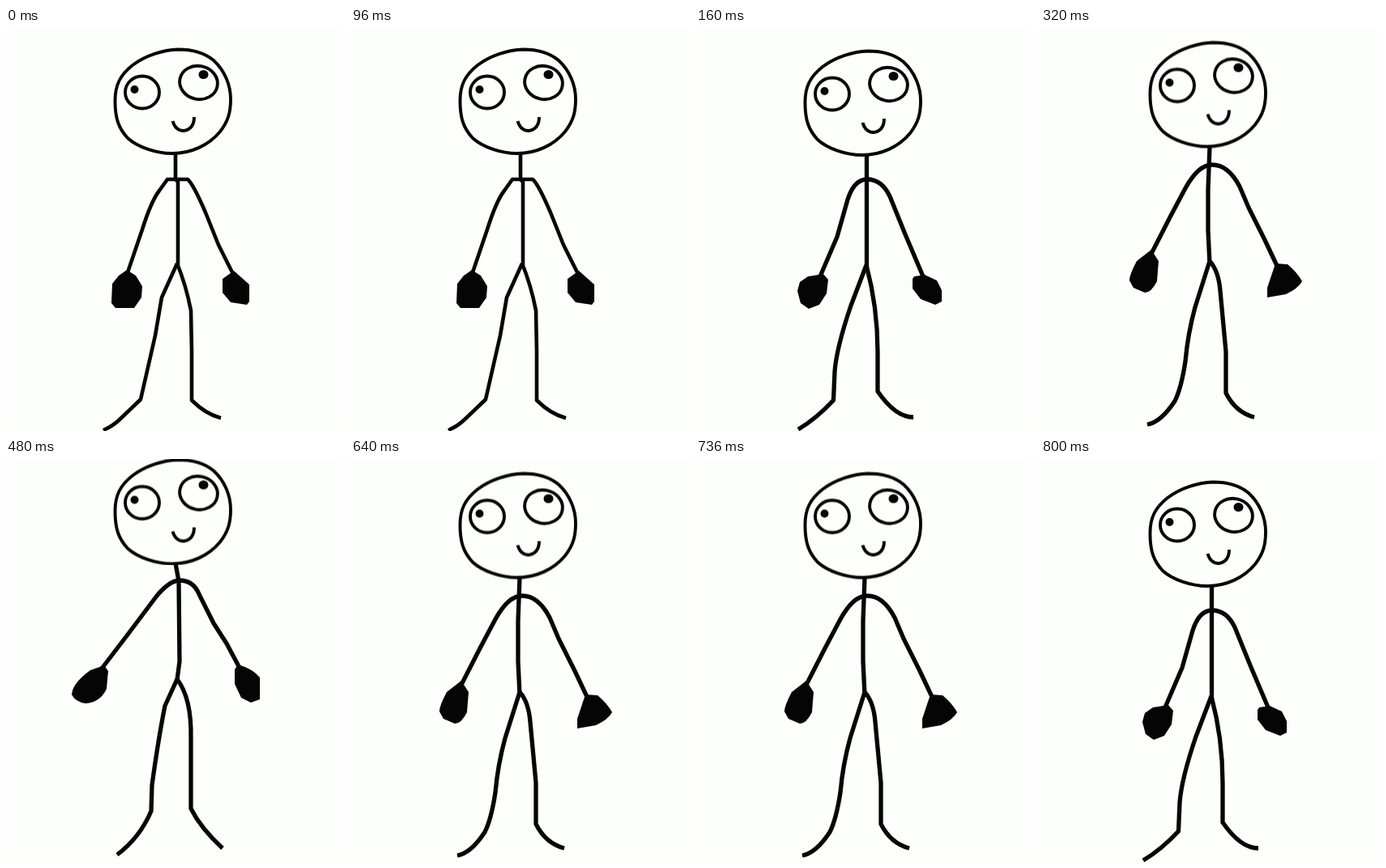
Recreate the animation shown at these times as an HTML page. Size 418 by 498 pixels, loop 960 ms.

```html
<!DOCTYPE html>
<html lang="en">
<head>
<meta charset="utf-8">
<title>Bobbing stick figure</title>
<style>
  html, body { margin: 0; width: 100%; height: 100%; overflow: hidden; background: #fdfffc; }
  svg { display: block; width: 418px; height: 498px; }
  path, ellipse { fill: none; stroke: #050505; stroke-width: 5.3; stroke-linejoin: round; }
  #head * { stroke-width: 3.9; }
  #head .pupil, .hand { fill: #050505; stroke: none; }
  .pose { opacity: 0; }
  .thin path:not(.hand) { stroke-width: 4.6; }
</style>
</head>
<body>
<svg viewBox="0 0 418 498">
  <g id="head">
    <path d="M212 26.5C194 27 172 34 156 46C141 58 134.500 70 134.500 90C134.500 112 139 124 150 136C162 147 185 155 205 155C228 155 250 145 264 128C274 115 277 104 277 88C277 71 270 53 256 40C244 30 229 26.500 212 26.500Z"/>
    <ellipse cx="168" cy="79.500" rx="21" ry="20"/>
    <ellipse cx="237.500" cy="67.500" rx="23.500" ry="20.500" transform="rotate(12 237.500 67.500)"/>
    <ellipse class="pupil" cx="158.500" cy="76" rx="5" ry="5"/>
    <ellipse class="pupil" cx="243.500" cy="57.500" rx="6" ry="5.500"/>
    <path d="M205.500 115Q209 127 219 127Q232 125 232 110"/>
  </g>

  <g class="pose thin">
    <path d="M209 155V187L212 190V293"/>
    <path d="M150 302L168 249Q179 214 189 201L199 187H224Q231 193 246 228L262 268L280 304"/>
    <path d="M211 291L192 333L184 380L166 459L142 482Q132 492 120 497"/>
    <path d="M211 291Q222 318 228 349L229 400V460Q246 477 265 482"/>
    <path class="hand" d="M149 299L160 306L168 319L167 333L158 346H135L130 340L131 316L139 306Z"/>
    <path class="hand" d="M281 300L300 317V338L297 342L277 339L267 327V310Z"/>
  </g>

  <g class="pose">
    <path d="M210.500 157V296"/>
    <path d="M153 307L174 258L187 212Q195 187 211 187Q229 187 239 208L258 255L280 307"/>
    <path d="M210 293L191 343Q173 396 171 425L169.500 460Q148 483 126 496"/>
    <path d="M210 293Q224 345 224 400V449Q246 481 268 481"/>
    <path class="hand" d="M138 307L157 304L163 311L161 328L152 342L139 347L129 340L125 325L128 314Z"/>
    <path class="hand" d="M269 307L282 305L297 312L303 324V338L295 342L277 335L267 322V310Z"/>
  </g>

  <g class="pose">
    <path d="M208 147L206 200V250L208 291"/>
    <path d="M136 279L160 232L178 198Q194 169 211 169Q231 169 245 196L256 222L276 262L292 296"/>
    <path d="M208 288L190 345Q181 378 178 412Q173 445 165 461Q148 487 131 490"/>
    <path d="M208 288Q219 300 221 325L228 400V451Q240 475 263 481"/>
    <path class="hand" d="M136 274L145 288L143 313Q136 327 128 327L114 321L109 312Q109 305 118 288Z"/>
    <path class="hand" d="M289 291L304 292Q316 302 322 313Q317 322 302 329L279 333V321Z"/>
  </g>

  <g class="pose">
    <path d="M209 129L213 151L214 250L211 273"/>
    <path d="M118 259L150 217L186 169Q202 150 214 150Q231 150 238 167L256 203L272 228L289 260"/>
    <path d="M211 272L196 305Q188 345 180 403L179 435Q165 468 137 489"/>
    <path d="M211 272Q229 296 228 345V432Q240 456 267 481"/>
    <path class="hand" d="M121 255L126 262L124 284Q116 301 98 302Q85 300 81 291Q82 277 104 261Z"/>
    <path class="hand" d="M286 254Q304 259 313 270V297L302 301L290 295L282 278V260Z"/>
  </g>
</svg>
<script>
  const STEP = 160;
  const SEQUENCE = [0, 1, 2, 3, 2, 1];
  const HEAD_Y = [0, 2, -8.5, -25.5];

  // Holds each pose for one step, then cuts to the next.
  function playSteps(element, frameOf) {
    const poses = [...SEQUENCE, SEQUENCE[0]];
    const frames = poses.map((pose, i) => ({
      ...frameOf(pose),
      offset: i / SEQUENCE.length,
      easing: 'step-end'
    }));
    element.animate(frames, { duration: STEP * SEQUENCE.length, iterations: Infinity });
  }

  playSteps(document.getElementById('head'),
    pose => ({ transform: `translateY(${HEAD_Y[pose]}px)` }));

  document.querySelectorAll('.pose').forEach((body, index) =>
    playSteps(body, pose => ({ opacity: pose === index ? 1 : 0 })));
</script>
</body>
</html>
```
